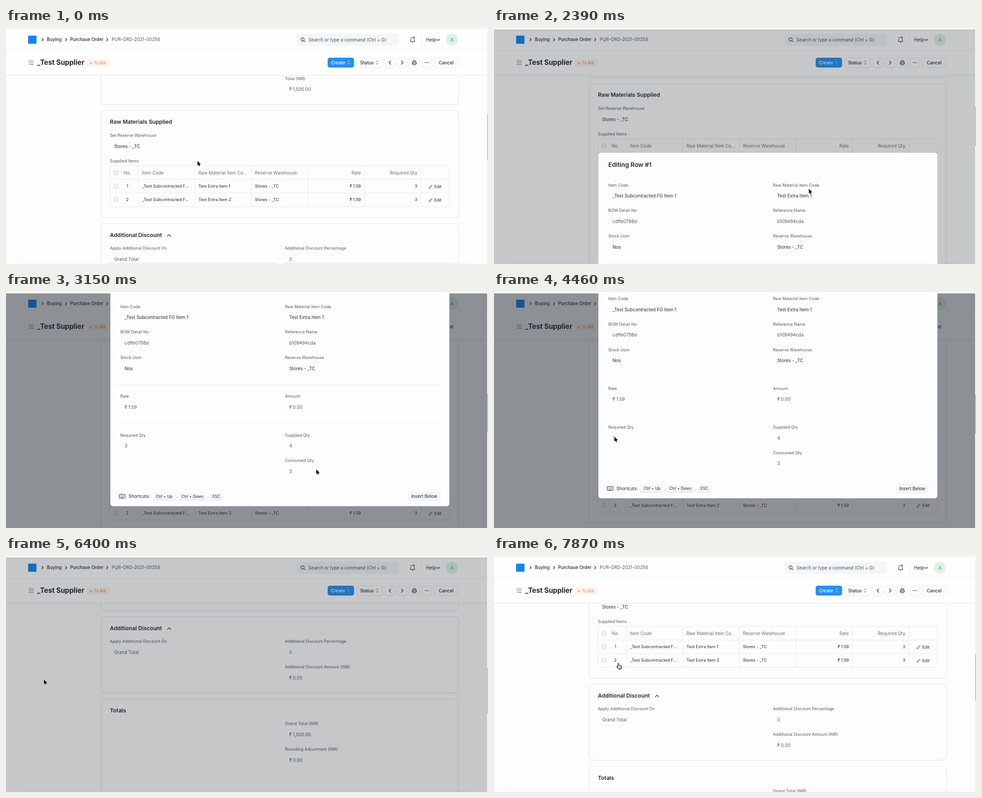
Animation of 1067 by 525 pixels, one loop 8 s. Source, as an HTML page with a canvas:

```html
<!DOCTYPE html>
<html lang="en">
<head>
<meta charset="utf-8">
<title>Purchase Order</title>
<style>
html, body { margin: 0; width: 100%; height: 100%; overflow: hidden; background: #fff; }
canvas { display: block; }
</style>
</head>
<body>
<canvas id="stage" width="1067" height="525"></canvas>
<script>
const W = 1067, H = 525, LOOP = 8000;
const ctx = document.getElementById('stage').getContext('2d');

const INK = '#1f272e', SOFT = '#505a62', MUTED = '#687178';
const LINE = '#e6e9ec', PAPER = '#fdfdfd', FILL = '#f4f5f6';
const MD = 9.9, SM = 9.15;
const GROW = 487; // extra height of the opened row

// [first change, last change, count]
const BURSTS = [
  [150, 1190, 8], [1340, 1640, 3], [1940, 1940, 1], [2390, 2710, 3], [3000, 4020, 8],
  [4170, 5200, 8], [5350, 5950, 5], [6400, 6690, 3], [6990, 7870, 7]
];
const SCROLL = [
  [1940, 0], [2390, 60], [2530, 154.5], [2710, 154.5], [3000, 330], [3145, 377],
  [3400, 394.5], [5950, 394.5], [6400, 300], [6540, 200], [6690, 154.5],
  [6990, 221], [7140, 221], [7430, 150]
];
const DIM = [[1940, 0], [2390, 0.5], [2530, 1], [5950, 1], [6400, 0.5], [6690, 0]];
const POINTER = [
  [0, 424, 296], [600, 235, 222], [1190, 366, 210], [1640, 712, 369], [1940, 694, 356],
  [2390, 697, 358], [2530, 689, 386], [2710, 688, 392], [3145, 687, 395], [3290, 687, 395],
  [4020, 330, 357], [4320, 264, 345], [4620, 270, 298], [5200, 641, 320], [5350, 635, 384],
  [5950, 84, 275], [6400, 84, 275], [6690, 330, 340], [6990, 369, 350], [7430, 369, 350],
  [7870, 271, 238]
];

function snap(t) {
  let s = 0;
  for (const [a, b, n] of BURSTS) {
    if (t < a) break;
    const step = (b - a) / (n - 1) || 1;
    s = a + Math.min(n - 1, Math.floor((t - a) / step + 0.15)) * step;
  }
  return s;
}

function track(keys, t, i = 1) {
  if (t <= keys[0][0]) return keys[0][i];
  for (let k = 1; k < keys.length; k++) {
    const p = keys[k - 1], q = keys[k];
    if (t <= q[0]) return p[i] + (q[i] - p[i]) * (t - p[0]) / (q[0] - p[0]);
  }
  return keys[keys.length - 1][i];
}

function text(str, x, y, color = INK, size = MD, weight = 400, align = 'left') {
  ctx.font = `${weight} ${size}px Inter, "Open Sans", sans-serif`;
  ctx.textAlign = align;
  ctx.fillStyle = color;
  ctx.fillText(str, x, y + size * 0.36);
}

function box(x, y, w, h, r, fill, stroke) {
  ctx.beginPath();
  ctx.roundRect(x, y, w, h, r);
  if (fill) { ctx.fillStyle = fill; ctx.fill(); }
  if (stroke) { ctx.strokeStyle = stroke; ctx.lineWidth = 1; ctx.stroke(); }
}

function rect(x, y, w, h, fill) {
  ctx.fillStyle = fill;
  ctx.fillRect(x, y, w, h);
}

function path(x, y, d, color = INK, width = 1.1, fill) {
  const p = new Path2D(d);
  ctx.save();
  ctx.translate(x, y);
  ctx.lineWidth = width;
  ctx.lineJoin = ctx.lineCap = 'round';
  if (fill) { ctx.fillStyle = fill; ctx.fill(p); }
  ctx.strokeStyle = color;
  ctx.stroke(p);
  ctx.restore();
}

function dot(x, y, r, color) {
  ctx.beginPath();
  ctx.arc(x, y, r, 0, Math.PI * 2);
  ctx.fillStyle = color;
  ctx.fill();
}

function card(top, bottom) {
  ctx.save();
  ctx.shadowColor = 'rgba(25,39,52,.09)';
  ctx.shadowBlur = 3;
  ctx.shadowOffsetY = 1;
  box(210.5, top, 791, bottom - top, 8, PAPER);
  ctx.restore();
  box(210.5, top, 791, bottom - top, 8, null, LINE);
}

function field(x, y, label, value, color = SOFT) {
  const top = Math.max(y + 12, 521), bottom = y + 36;
  if (bottom > top) rect(x, top, 365, bottom - top, '#f5f6f6');
  text(label, x, y, SOFT, SM);
  text(value, x + 9.5, y + 24, color);
}

function checkbox(y) {
  box(238.5, y - 5, 10, 10, 2.5, '#f0f1f2', '#d8dcdf');
}

function row(n, y) {
  checkbox(y);
  text(n, 268.5, y, INK, SM, 400, 'center');
  text('_Test Subcontracted F...', 301, y, INK, SM);
  text('Test Extra Item ' + n, 426, y, INK, SM);
  text('Stores - _TC', 551, y, INK, SM);
  text('₹ 1.59', 785.5, y, INK, SM, 400, 'right');
  text('3', 910.5, y, INK, SM, 400, 'right');
  path(936, y - 3, 'M.5 7.2L1.1 4.9L5.6.4L7.3 2.1L2.8 6.6Z', INK, 0.9);
  text('Edit', 948, y + 0.5, INK, SM);
}

function table(y, grow) {
  const bottom = y + 91 + grow;
  box(230.5, y, 751, bottom - y, 6, PAPER, LINE);
  for (const x of [293, 418, 543.5, 668, 793.5, 918.5]) rect(x - 0.5, y, 1, bottom - y, LINE);
  rect(230.5, y + 30, 751, 1, LINE);
  rect(230.5, y + 60 + grow, 751, 1, LINE);
  const h = y + 15.5;
  checkbox(h);
  text('No.', 260.5, h, MUTED);
  text('Item Code', 301, h, MUTED);
  text('Raw Material Item Co...', 426, h, MUTED);
  text('Reserve Warehouse', 551, h, MUTED);
  text('Rate', 785.5, h, MUTED, MD, 400, 'right');
  text('Required Qty', 910.5, h, MUTED, MD, 400, 'right');
  if (!grow) row('1', y + 45.5);
  row('2', y + 75.5 + grow);
}

function page(scroll, grow) {
  const a = -scroll, b = a + grow;
  card(a - 60, a + 170);
  field(617.5, a + 112.5, 'Total (INR)', '₹ 1,500.00');

  card(a + 183.5, b + 421);
  text('Raw Materials Supplied', 230, a + 209, INK, 12.2, 600);
  field(230, a + 239, 'Set Reserve Warehouse', 'Stores - _TC', INK);
  text('Supplied Items', 230, a + 296, SOFT, SM);
  table(a + 306.5, grow);

  card(b + 435, b + 604);
  text('Additional Discount', 230, b + 460.5, INK, 12.2, 600);
  path(361, b + 461.5, 'M-4 2L0-2L4 2');
  field(230, b + 490, 'Apply Additional Discount On', 'Grand Total');
  field(617.5, b + 490, 'Additional Discount Percentage', '0');
  field(617.5, b + 547, 'Additional Discount Amount (INR)', '₹ 0.00');

  card(b + 618, b + 960);
  text('Totals', 230, b + 643.5, INK, 12.2, 600);
  field(617.5, b + 673, 'Grand Total (INR)', '₹ 1,500.00');
  field(617.5, b + 730, 'Rounding Adjustment (INR)', '₹ 0.00');
}

function button(x, w) {
  box(x, 66.5, w, 21.5, 5, '#fff', '#dfe3e6');
}

function navbar() {
  rect(0, 0, W, 105, '#fefefe');
  rect(0, 2, W, 1, '#e8e8e8');
  rect(0, 48, 1065, 1, '#eceff1');
  rect(0, 105, 1065, 1, '#e6e9ec');
  rect(0, 106, 1065, 1, 'rgba(25,39,52,.025)');

  rect(49, 17, 18.5, 18, '#0f86f5');
  for (const x of [81, 133, 224]) path(x, 26, 'M-1.5-3L1.5 0L-1.5 3', INK, 1.3);
  text('Buying', 90.5, 25.5, INK, MD, 500);
  text('Purchase Order', 142, 25.5, INK, MD, 500);
  text('PUR-ORD-2021-00256', 234, 25.5, SOFT);

  box(643, 13, 227, 26.5, 6, FILL);
  path(657, 25.5, 'M3.2 0A3.6 3.6 0 1 1-4 0A3.6 3.6 0 1 1 3.2 0M2.2 2.6L5 5.4', INK, 1.1);
  text('Search or type a command (Ctrl + G)', 669.5, 26, '#48525a');
  path(900, 26, 'M-5.3 3.6C-3.7 2.4-4-.2-3.7-2.2C-3.3-6.6 3.3-6.6 3.7-2.2C4-.2 3.7 2.4 5.3 3.6ZM-1.5 5.5C-.7 6.6.7 6.6 1.5 5.5', INK, 1);
  dot(903, 21, 2, '#e24c4c');
  rect(919, 13, 1, 26, '#e8ebed');
  text('Help', 930, 26, INK, 10.4);
  path(957, 26.5, 'M-3-1.5L0 1.5L3-1.5');
  dot(987, 26, 13.5, '#ddf2e4');
  text('A', 987, 26, '#47a06b', 10.7, 400, 'center');

  for (const y of [73, 77, 81]) rect(50, y - 0.5, 11.5, 1.1, '#6c767d');
  text('_Test Supplier', 69, 76.5, INK, 15.24, 700);
  box(180, 69, 48.5, 17, 6, '#fff3ec');
  dot(188, 78, 1.6, '#f0783c');
  text('To Bill', 195, 78, '#ee7b4b', SM);

  const updown = 'M-2-1.8L0-3.8L2-1.8M-2 1.8L0 3.8L2 1.8';
  box(712, 66, 58.5, 22, 5, '#2490ef');
  text('Create', 719.5, 77, '#fff', MD, 500);
  path(758.5, 77, updown, '#fff', 1);
  button(776.5, 57);
  text('Status', 784, 77, INK, MD, 500);
  path(821.5, 77, updown, INK, 1);
  for (const x of [839.5, 866.5, 893.5, 920.5]) button(x, 21.5);
  path(850, 77, 'M1.7-3.7L-2 0L1.7 3.7', INK, 1.3);
  path(877, 77, 'M-1.7-3.7L2 0L-1.7 3.7', INK, 1.3);
  path(904, 77, 'M-2.8-1.5V-4.8H2.8V-1.5M-2.8 3H-4.7V-1.5H4.7V3H2.8M-2.8 1H2.8V5H-2.8Z', INK, 1);
  for (const x of [928, 931.5, 935]) dot(x, 77, 0.9, INK);
  button(947.5, 53.5);
  text('Cancel', 974.3, 77, INK, MD, 500, 'center');
}

function key(x, w, y, label) {
  box(x, y - 6.5, w, 15, 4, '#cfd4d8');
  box(x, y - 7.5, w, 15, 4, FILL);
  text(label, x + w / 2, y, INK, 8.6, 400, 'center');
}

function dialog(scroll) {
  ctx.save();
  ctx.beginPath();
  ctx.rect(0, 3, 1065, H);
  ctx.clip();
  ctx.translate(0, -scroll);
  box(231, 337.5, 750.5, 516, 6, PAPER);
  text('Editing Row #1', 253, 364.5, INK, 13.7, 600);
  const item = (x, y, label, value, color) => {
    text(label, x, y, SOFT, SM);
    text(value, x + 9.5, y + 24, color);
  };
  const L = 253, R = 617.5;
  item(L, 409.5, 'Item Code', '_Test Subcontracted FG Item 1', INK);
  item(R, 409.5, 'Raw Material Item Code', 'Test Extra Item 1', INK);
  item(L, 466, 'BOM Detail No', 'cdffe0798d', SOFT);
  item(R, 466, 'Reference Name', 'b109494cda', SOFT);
  item(L, 523, 'Stock Uom', 'Nos', INK);
  item(R, 523, 'Reserve Warehouse', 'Stores - _TC', INK);
  rect(240, 583.5, 731, 1, '#f1f3f4');
  item(L, 609, 'Rate', '₹ 1.59', SOFT);
  item(R, 609, 'Amount', '₹ 0.00', SOFT);
  rect(240, 669.5, 731, 1, '#f1f3f4');
  item(L, 695.5, 'Required Qty', '3', SOFT);
  item(R, 695.5, 'Supplied Qty', '4', SOFT);
  item(R, 752, 'Consumed Qty', '3', SOFT);

  const y = 831.5;
  box(250.5, y - 4.5, 13, 9, 1.5, null, INK);
  for (const dy of [-2, 0]) for (let x = 252.5; x < 262; x += 2) rect(x, y + dy - 0.5, 1, 1, INK);
  rect(254, y + 2, 6, 1, INK);
  text('Shortcuts:', 271, y, INK);
  key(326, 48, y, 'Ctrl + Up');
  text('.', 377.5, y);
  key(383, 59.5, y, 'Ctrl + Down');
  text('.', 445.5, y);
  key(451, 29, y, 'ESC');
  box(890, y - 11, 72.5, 22, 6, FILL);
  text('Insert Below', 926, y, INK, MD, 400, 'center');
  ctx.restore();
}

function scrollbar(scroll, open) {
  rect(1065, 3, 2, H, '#f3f3f3');
  if (open) box(1065, 165.5 + scroll * 0.158, 2, 87.5, 1, '#c1c3c6');
  else box(1065, 192 + scroll * 0.186, 2, 102, 1, '#c1c3c6');
}

const ARROW = 'M0 0V10L2.3 8L3.8 11.3L5.5 10.6L4 7.4L7.1 7.2Z';
const HAND = 'M3.2 8.2V1.6A1.1 1.1 0 0 1 5.4 1.6V5.6C5.6 4.7 7.4 4.8 7.5 5.9C7.9 5.1 9.4 5.3 9.5 6.4' +
  'C10 5.9 11.5 6.1 11.5 7.4V9.5C11.5 11.5 10.3 12 10.2 13.6H4.7C4.5 12 2.3 10.4 .9 8.4C.3 7.3 1.8 6.5 3.2 8.2Z';

function pointer(t) {
  const x = track(POINTER, t, 1), y = track(POINTER, t, 2);
  if ((t >= 1940 && t < 2390) || t > 7700) {
    path(x, y, HAND, '#111', 1.1, '#fff');
    path(x, y, 'M6.1 9V11.5M8 9V11.5M9.8 9V11.5', '#111', 0.7);
  } else {
    path(x, y, ARROW, '#fff', 1.4);
    path(x, y, ARROW, '#000', 0.2, '#000');
  }
}

function draw(now) {
  const t = snap(now % LOOP);
  const scroll = track(SCROLL, t), dim = track(DIM, t);
  const open = t >= 2390 && t < 6400;

  rect(0, 0, W, H, PAPER);
  page(scroll, open ? GROW : 0);
  rect(25, 523, 1012, 2, 'rgba(25,39,52,.025)');
  navbar();
  if (dim > 0) {
    rect(0, 0, W, 3, '#fff');
    rect(0, 3, 1065, H, `rgba(31,39,46,${0.5 * dim})`);
  }
  if (open) dialog(scroll);
  scrollbar(scroll, open);
  pointer(t);
}

const start = performance.now();
function tick() {
  draw(performance.now() - start);
  requestAnimationFrame(tick);
}
tick();
</script>
</body>
</html>
```
